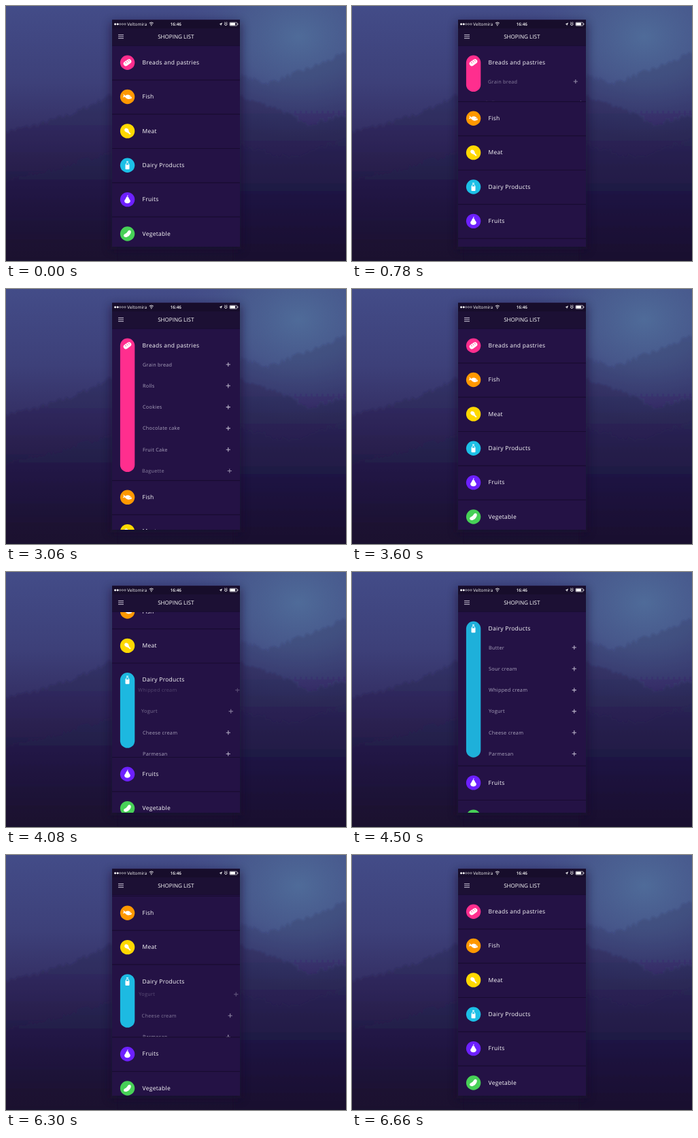
Recreate the animation shown at these times as an HTML page. Size 500 px wide and 375 px high, loop 7200 ms.

```html
<!DOCTYPE html>
<html lang="en">
<head>
<meta charset="utf-8">
<title>Shopping list</title>
<style>
html, body { margin: 0; width: 100%; height: 100%; overflow: hidden; background: #1a112f; }
svg { display: block; width: 100vw; height: 100vh; }
text { font-family: "Open Sans", sans-serif; fill: #fff; text-rendering: geometricPrecision; }
.label { font-size: 8.5px; letter-spacing: .27px; }
.item { font-size: 7.3px; letter-spacing: .27px; fill: #aaa3bd; }
.plus { stroke: #bbb5cb; stroke-width: 1.1; }
</style>
</head>
<body>
<svg viewBox="0 0 500 375">
  <defs>
    <linearGradient id="sky" x2="0" y2="1">
      <stop offset="0" stop-color="#434c88"/>
      <stop offset=".3" stop-color="#3d4079"/>
      <stop offset=".5" stop-color="#342f64"/>
      <stop offset=".7" stop-color="#261d4b"/>
      <stop offset=".9" stop-color="#1c1237"/>
      <stop offset="1" stop-color="#1a112f"/>
    </linearGradient>
    <radialGradient id="glow">
      <stop offset="0" stop-color="#4f6b99"/>
      <stop offset=".45" stop-color="#4a5f90" stop-opacity=".75"/>
      <stop offset="1" stop-color="#434c88" stop-opacity="0"/>
    </radialGradient>
    <linearGradient id="slope" x2="0" y2="1">
      <stop offset="0" stop-color="#2a2655" stop-opacity=".8"/>
      <stop offset=".5" stop-color="#1f1642" stop-opacity=".8"/>
      <stop offset="1" stop-color="#1a112f"/>
    </linearGradient>
    <filter id="haze"><feGaussianBlur stdDeviation="1.3"/></filter>
    <filter id="shade" x="-30%" y="-30%" width="160%" height="160%"><feGaussianBlur stdDeviation="7"/></filter>
    <clipPath id="list"><rect x="156" y="58.5" width="188" height="295.5"/></clipPath>
    <clipPath id="panel"><rect id="panelBox" x="156" width="188"/></clipPath>
  </defs>

  <rect width="500" height="375" fill="url(#sky)"/>
  <ellipse cx="430" cy="45" rx="190" ry="150" fill="url(#glow)"/>
  <g id="hills" filter="url(#haze)"></g>
  <rect x="154" y="24" width="192" height="334" fill="#140c2c" opacity=".55" filter="url(#shade)"/>

  <rect x="156" y="20.5" width="188" height="333.5" fill="#241245"/>
  <g clip-path="url(#list)">
    <g id="rows"></g>
    <g id="panels" clip-path="url(#panel)"></g>
  </g>
  <rect x="156" y="20.5" width="188" height="38" fill="#1c1034"/>
  <rect x="156" y="20.5" width="188" height="12.5" fill="#170d2b"/>
  <path d="M156 58.5h188" stroke="#190c33"/>
  <g id="signal" stroke="#fff" stroke-width=".5"></g>
  <text x="178.2" y="29" font-size="6.3" letter-spacing=".1">Veltomira</text>
  <g fill="none" stroke="#fff" stroke-width=".9">
    <path d="M210.8 25.2q3-2.4 6 0M212 26.8q1.8-1.5 3.6 0"/>
    <circle cx="213.8" cy="28.5" r=".4"/>
    <circle cx="323.3" cy="26.7" r="1.7"/>
    <path d="M321.2 24.4l1-.8M325.4 24.4l-1-.8"/>
  </g>
  <text x="249.8" y="29" font-size="6.3" font-weight="600" text-anchor="middle">16:46</text>
  <path d="M313.5 26.8l4.6-2.2-2.2 4.7-.3-2.2z" fill="#fff"/>
  <rect x="329" y="24.2" width="10.8" height="4.8" rx=".8" fill="none" stroke="#fff" stroke-width=".6"/>
  <rect x="329.5" y="24.7" width="7.6" height="3.8" fill="#fff"/>
  <path d="M340.8 25.6v2" stroke="#fff"/>
  <path d="M165 42.4h8M165 45h8M165 47.6h8" stroke="#d8d3e2" stroke-width=".9"/>
  <text x="249.8" y="48" font-size="8.1" font-weight="500" text-anchor="middle">SHOPING LIST</text>
</svg>
<script>
const LOOP = 7200, STEP = 60, STEPS = 10;
const $ = id => document.getElementById(id);
const clamp = v => Math.max(0, Math.min(1, v));
const ease = x => x < .5 ? 2 * x * x : 1 - 2 * (1 - x) ** 2;
const mix = (a, b, p) => a + (b - a) * p;

function add(parent, tag, attrs, content = '') {
  const el = document.createElementNS('http://www.w3.org/2000/svg', tag);
  for (const key in attrs) el.setAttribute(key, attrs[key]);
  el.innerHTML = content;
  return parent.appendChild(el);
}

// Icons are centred on 0,0; cut-outs take the colour of the disc.
const icons = {
  bread: c => `<rect x="-6.3" y="-3.4" width="12.6" height="6.8" rx="3.4" fill="#fff" transform="rotate(-35)"/>
    <path d="M-3.6-.6l2.2 1.8M-1.2-2.2l2.2 1.8M1.2-3.8l2.2 1.8" stroke="${c}" stroke-width=".9"/>`,
  fish: c => `<g transform="rotate(14)"><path d="M-6.8-2.8L-3.6-.8Q1.5-6 7 .2 1.5 5.4-3.6.8L-6.4 2.6-5.6 0z" fill="#fff"/>
    <circle cx="4" cy="-.7" r=".6" fill="${c}"/></g>`,
  meat: () => `<path d="M-4.2-2.6C-3.4-5.2 1-4.6 1.8-1.4 2.2.4 2.6 1.4 3.9 2.9a1 1 0 1 1-1.1 1.1C1.4 2.8.4 2.4-.8 2-3.6 1.2-4.8-.6-4.2-2.6z" fill="#fff"/>`,
  milk: c => `<path d="M-1.4-6h2.8v2.4L3-1v6q0 1-1 1h-4q-1 0-1-1v-6l1.6-2.6z" fill="#fff"/>
    <path d="M-1.5-4.3h3" stroke="${c}" stroke-width=".8"/><path d="M-2.1-.8L-.7-3.2H.7L2.1-.8z" fill="${c}"/>`,
  pear: () => `<path d="M0-4.4C2-4.2 1.8-1.8 3-.4 5.8 2.4 3.8 5.6 0 5.6S-5.8 2.4-3-.4C-1.8-1.8-2-4.2 0-4.4z" fill="#fff"/>
    <path d="M0-4.4L.6-6.4" stroke="#fff"/>`,
  pod: () => `<path d="M3.4-5.2C6.2-4.6 5.6-.4 3 2.2.4 5-4 6.2-5.2 3.6-6 1.4-4 .4-2.4-.4.2-1.6.6-5.6 3.4-5.2z" fill="#fff"/>`
};

const rows = [
  ['Breads and pastries', 'bread', '#ff2e8e'],
  ['Fish', 'fish', '#ff9800'],
  ['Meat', 'meat', '#ffd800'],
  ['Dairy Products', 'milk', '#1cbfe6'],
  ['Fruits', 'pear', '#6d20ff'],
  ['Vegetable', 'pod', '#47d057']
].map(([name, icon, color], i) => {
  const g = add($('rows'), 'g', {});
  const line = add(g, 'path', { d: 'M156 25.6h188', stroke: '#180b31', 'stroke-width': 1.2 });
  const bar = add(g, 'rect', { x: 167.9, y: -10.7, width: 21.4, height: 21.4, rx: 10.7, fill: color });
  add(g, 'g', { transform: 'translate(178.5 0)' }, icons[icon](color));
  add(g, 'text', { x: 200.6, y: 2.7, class: 'label' }, name);
  return { g, bar, line, y: 83.2 + 50.35 * i };
});

const panels = {
  0: ['Grain bread', 'Rolls', 'Cookies', 'Chocolate cake', 'Fruit Cake', 'Baguette'],
  3: ['Butter', 'Sour cream', 'Whipped cream', 'Yogurt', 'Cheese cream', 'Parmesan']
};
for (const key in panels) {
  panels[key] = panels[key].map((name, i) => {
    const y = 111 + 31.3 * i, g = add($('panels'), 'g', {});
    return {
      g,
      text: add(g, 'text', { x: 201, y: y + 2.5, class: 'item' }, name),
      plus: add(g, 'path', { d: `M323.7 ${y}h6.2M326.8 ${y - 3.1}v6.2`, class: 'plus' })
    };
  });
}

for (let i = 0; i < 5; i++)
  add($('signal'), 'circle', { cx: 160.6 + 3.6 * i, cy: 26.7, r: 1.2, fill: i < 2 ? '#fff' : 'none' });

// Wooded ridges: straight runs between a few points, broken up by small treetops.
let seed = 7;
const random = () => (seed = seed * 16807 % 2147483647) / 2147483647;
function ridge(points, opacity) {
  let d = `M${points[0][0]} 375`;
  for (let k = 1; k < points.length; k++) {
    const [x0, y0] = points[k - 1], [x1, y1] = points[k];
    for (let x = x0; x < x1; x += 3)
      d += `L${x} ${mix(y0, y1, (x - x0) / (x1 - x0)) - random() * 8}`;
  }
  add($('hills'), 'path', { d: `${d}V375z`, fill: 'url(#slope)', opacity });
}
ridge([[-5, 190], [50, 178], [100, 162], [165, 130]], .5);
ridge([[-5, 262], [70, 245], [165, 215]], .35);
ridge([[335, 105], [385, 118], [440, 98], [505, 72]], .25);
ridge([[335, 135], [400, 155], [440, 178], [505, 165]], .45);
ridge([[335, 205], [420, 228], [505, 200]], .5);

// Each cycle: which row, when it opens, when it closes.
const cycles = [[0, 660, 3060], [3, 3840, 6000]];

function draw(time) {
  const now = Math.floor(time / STEP) * STEP;
  const [active, openAt, closeAt] = cycles[now < 3780 ? 0 : 1];
  const closing = now >= closeAt;
  const n = Math.max(0, (now - (closing ? closeAt : openAt)) / STEP + 1);
  const move = ease(clamp(n / STEPS));
  const p = closing ? 1 - move : move;
  const up = -151 * (active / 3) * p, down = up + 176.3 * p;

  rows.forEach((row, i) => {
    const open = i === active ? p : 0;
    row.g.setAttribute('transform', `translate(0 ${row.y + (i > active ? down : up)})`);
    row.bar.setAttribute('height', 21.4 + 178.8 * open);
    row.line.setAttribute('transform', `translate(0 ${176.3 * open})`);
  });
  const tint = active === 3 ? p : 0;
  rows[3].bar.setAttribute('fill', `rgb(${mix(28, 30, tint)},${mix(191, 176, tint)},${mix(230, 218, tint)})`);

  $('panelBox').setAttribute('y', rows[active].y + up + 12);
  $('panelBox').setAttribute('height', 176.3 * p + 13);

  for (const key in panels) panels[key].forEach((item, i) => {
    const shown = +key === active && p > 0;
    item.g.setAttribute('display', shown ? 'inline' : 'none');
    if (!shown) return;
    const fromTop = (active === 0) !== closing;
    const q = clamp((n - 1.2 * (fromTop ? i : 5 - i)) / 4);
    const away = closing ? q : 1 - q;
    item.g.setAttribute('opacity', 1 - away);
    item.text.setAttribute('transform', `translate(${-16 * away * away} 0)`);
    item.plus.setAttribute('transform', `translate(${32 * away * away} 0)`);
  });
}

const start = performance.now();
function tick() {
  draw((performance.now() - start) % LOOP);
  requestAnimationFrame(tick);
}
tick();
</script>
</body>
</html>
```
